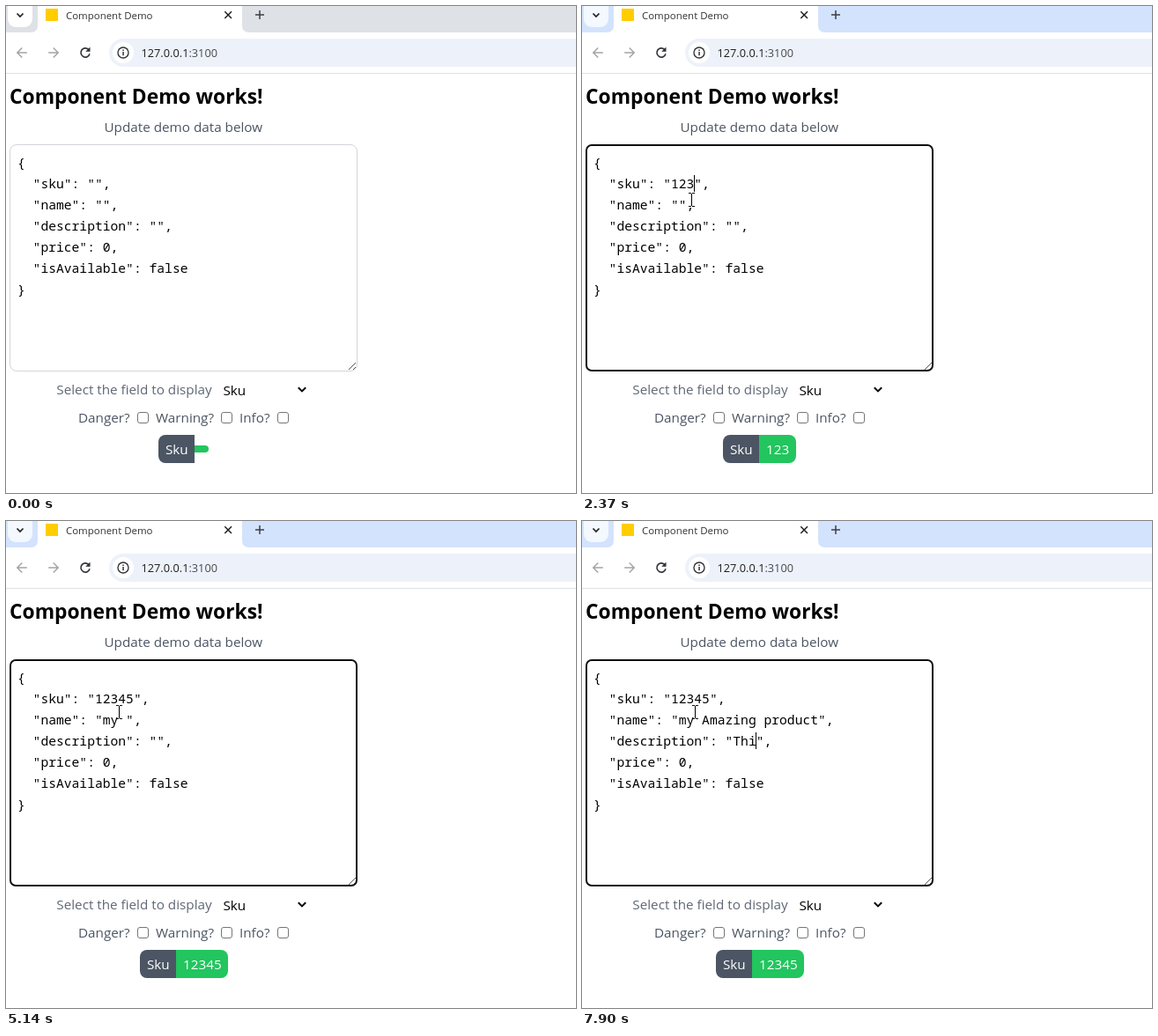
Animation, 647 px wide and 553 px high, one loop 8000 ms. Source, as an HTML page with a canvas:

```html
<!DOCTYPE html>
<html lang="en">
<head>
<meta charset="utf-8">
<title>Component Demo</title>
<style>
  html, body { margin: 0; width: 100%; height: 100%; overflow: hidden; background: #fff; }
  canvas { display: block; }
</style>
</head>
<body>
<canvas id="stage" width="647" height="553"></canvas>
<script>
const ctx = document.getElementById('stage').getContext('2d');
const LOOP = 8000;
const TICK = 125;
const CLICK = 1370;
const RELEASE = 1620;
const SANS = '"Open Sans", "Noto Sans", sans-serif';
const MONO = '"Noto Sans Mono", "DejaVu Sans Mono", monospace';
const BODY = '15.25px ' + SANS;
const CELL = 8.8;
const LINE = 24;
const SLATE = '#4b5563';
const GREEN = '#22c55e';
const INK = '#303236';

const heads = ['  "sku": "', '  "name": "', '  "description": "'];

// Key bursts: arrows move the caret, anything else is typed.
const bursts = [
  { start: 1870, gap: 250, keys: '12345' },
  { start: 3120, gap: 125, keys: '↓←←' },
  { start: 4250, gap: 195, keys: 'my ' },
  { start: 5270, gap: 120, keys: 'Ama' },
  { start: 5760, gap: 88, keys: 'zing produc' },
  { start: 6890, gap: 0, keys: 't' },
  { start: 7150, gap: 125, keys: '↓←←' },
  { start: 7770, gap: 65, keys: 'Thi' }
];

const moves = [
  { start: 740, end: 1250, from: [300, 540], to: [102, 202] },
  { start: 1620, end: 2000, from: [102, 202], to: [124, 220] },
  { start: 3500, end: 3750, from: [124, 220], to: [128, 217] }
];

function replay(t) {
  const state = { values: ['', '', ''], field: 0, offset: 0, last: CLICK };
  for (const { start, gap, keys } of bursts) {
    [...keys].forEach((key, i) => {
      const time = start + i * gap;
      if (time > t) return;
      state.last = time;
      if (key === '↓') {
        state.field++;
        state.offset = 2;
      } else if (key === '←') {
        state.offset--;
      } else {
        state.values[state.field] += key;
        state.offset++;
      }
    });
  }
  return state;
}

function pointerAt(t) {
  const now = Math.floor(t / TICK) * TICK;
  const move = moves.filter(m => m.start <= now).pop();
  if (!move) return null;
  const p = Math.min(1, (now - move.start) / (move.end - move.start));
  const ease = 1 - (1 - p) ** 2;
  return move.from.map((a, i) => Math.round(a + (move.to[i] - a) * ease));
}

function text(str, x, y, font, color) {
  ctx.font = font;
  ctx.fillStyle = color;
  ctx.fillText(str, x, y);
}

function rect(x, y, w, h, color) {
  ctx.fillStyle = color;
  ctx.fillRect(x, y, w, h);
}

function round(x, y, w, h, r, fill, stroke, width = 1) {
  ctx.beginPath();
  ctx.roundRect(x, y, w, h, r);
  ctx.fillStyle = fill;
  ctx.fill();
  if (!stroke) return;
  ctx.strokeStyle = stroke;
  ctx.lineWidth = width;
  ctx.stroke();
}

function disc(x, y, r, color) {
  ctx.beginPath();
  ctx.arc(x, y, r, 0, Math.PI * 2);
  ctx.fillStyle = color;
  ctx.fill();
}

function path(d, color, width, fill) {
  const p = new Path2D(d);
  if (fill) { ctx.fillStyle = fill; ctx.fill(p); }
  ctx.strokeStyle = color;
  ctx.lineWidth = width;
  ctx.stroke(p);
}

function drawArrow(x, dir, color) {
  ctx.save();
  ctx.translate(x, 53);
  ctx.scale(dir, 1);
  path('M-5.5 0 H5.5 M0 -5.5 L5.5 0 L0 5.5', color, 1.5);
  ctx.restore();
}

function drawBrowser(active) {
  rect(0, 0, 647, 30, active ? '#d3e3fd' : '#dee1e6');
  round(2, -8, 28, 32, 9, active ? '#f4f8ff' : '#fff');
  path('M12.5 8.5 L16 12 L19.5 8.5', '#1f1f1f', 1.7);

  ctx.fillStyle = '#fff';
  ctx.fill(new Path2D('M28 30 Q36 30 36 22 V0 H268 V22 Q268 30 276 30 Z'));
  rect(45, 3, 14, 14, '#ffcd00');
  text('Component Demo', 68, 15, '11.45px ' + SANS, INK);
  path('M248.3 6.3 L256 14 M256 6.3 L248.3 14', '#1f1f1f', 1.5);
  path('M288 5 V15 M283 10 H293', '#3c4043', 1.5);

  drawArrow(18.3, -1, '#a3a5a8');
  drawArrow(53.7, 1, '#a3a5a8');
  path('M94.2 50 A5.1 5.1 0 1 0 95 54.3', INK, 1.6);
  path('M95.2 47.2 V51.6 H90.8 Z', INK, 0.6, INK);

  round(117, 37, 560, 32, 16, '#edf2fa');
  disc(133, 53, 12, '#fff');
  disc(133, 53, 6.7, INK);
  disc(133, 53, 5.3, '#fff');
  rect(132.3, 52, 1.5, 4.2, INK);
  rect(132.3, 49.5, 1.5, 1.5, INK);

  const host = '127.0.0.1';
  const font = '12.75px ' + SANS;
  text(host, 153.5, 58, font, '#1f1f1f');
  text(':3100', 153.5 + ctx.measureText(host).width, 58, font, '#474a4f');
  rect(0, 76, 647, 1, '#dfe1e5');
}

function drawEditor(active, values) {
  if (active) round(5, 158, 393, 256, 6, '#fff', '#101010', 2);
  else round(4.5, 157.5, 394, 257, 7.5, '#fff', '#d1d5db');
  path('M389 413 L397 405 M394 413 L397 410', '#555', 1);

  const lines = [
    '{',
    ...heads.map((head, i) => head + values[i] + '",'),
    '  "price": 0,',
    '  "isAvailable": false',
    '}'
  ];
  lines.forEach((line, i) => text(line, 13, 183 + i * LINE, '14.667px ' + MONO, '#000'));
}

function drawCheck(label, x, box) {
  text(label, x, 473, BODY, SLATE);
  round(box + 0.5, 461.5, 12, 12, 2.5, '#fff', '#767676');
}

function drawControls() {
  text('Select the field to display', 57.3, 441, BODY, '#5f6775');
  text('Sku', 246.5, 442, BODY, '#000');
  path('M331.8 433.2 L336 437.4 L340.2 433.2', '#000', 2);
  drawCheck('Danger?', 82, 149);
  drawCheck('Warning?', 170, 244);
  drawCheck('Info?', 265, 308);
}

function drawBadge(value) {
  const keyWidth = 41;
  const valueWidth = Math.round(16 + value.length * 8.62);
  const x = Math.round(201.7 - (keyWidth + valueWidth) / 2);
  const mid = x + keyWidth;
  round(x, 487, keyWidth, 32, [8, 0, 0, 8], SLATE);
  text('Sku', x + 8, 509, BODY, '#fff');
  const height = value ? 32 : 8;
  const r = height / 4 + (value ? 0 : 2);
  round(mid, 503 - height / 2, valueWidth, height, [0, r, r, 0], GREEN);
  text(value, mid + 8, 509, BODY, '#fff');
}

function drawCaret({ values, field, offset, last }, t) {
  if ((t - last) % 1000 >= 500) return;
  // After a jump the offset counts from the start of an empty value.
  const col = heads[field].length + offset;
  rect(Math.floor(13 + col * CELL), 192 + field * LINE, 1, 19, '#000');
}

function drawPointer([x, y]) {
  if (y > 415) {
    ctx.save();
    ctx.translate(x, y);
    path('M.5 .5 V16.5 L4.2 13 L6.6 18.5 L9 17.5 L6.6 12 H11.7 Z', '#000', 1, '#fff');
    ctx.restore();
    return;
  }
  rect(x, y - 7, 1, 14, '#000');
  for (const row of [y - 8, y + 7]) {
    rect(x - 3, row, 3, 1, '#000');
    rect(x + 1, row, 3, 1, '#000');
  }
}

function draw(t) {
  const state = replay(t);
  const pointer = pointerAt(t);
  const active = t >= CLICK;

  rect(0, 0, 647, 553, '#fff');
  drawBrowser(active);
  text('Component Demo works!', 4, 111, 'bold 22.8px ' + SANS, '#000');
  text('Update demo data below', 111.5, 143, BODY, SLATE);
  drawEditor(active, state.values);
  drawControls();
  drawBadge(state.values[0]);
  if (active) drawCaret(state, t);
  if (active && t < RELEASE) disc(101, 201.5, 12.5, 'rgba(255, 255, 0, 0.6)');
  if (pointer) drawPointer(pointer);
}

const begin = performance.now();
function tick() {
  draw((performance.now() - begin) % LOOP);
  requestAnimationFrame(tick);
}
tick();
</script>
</body>
</html>
```
